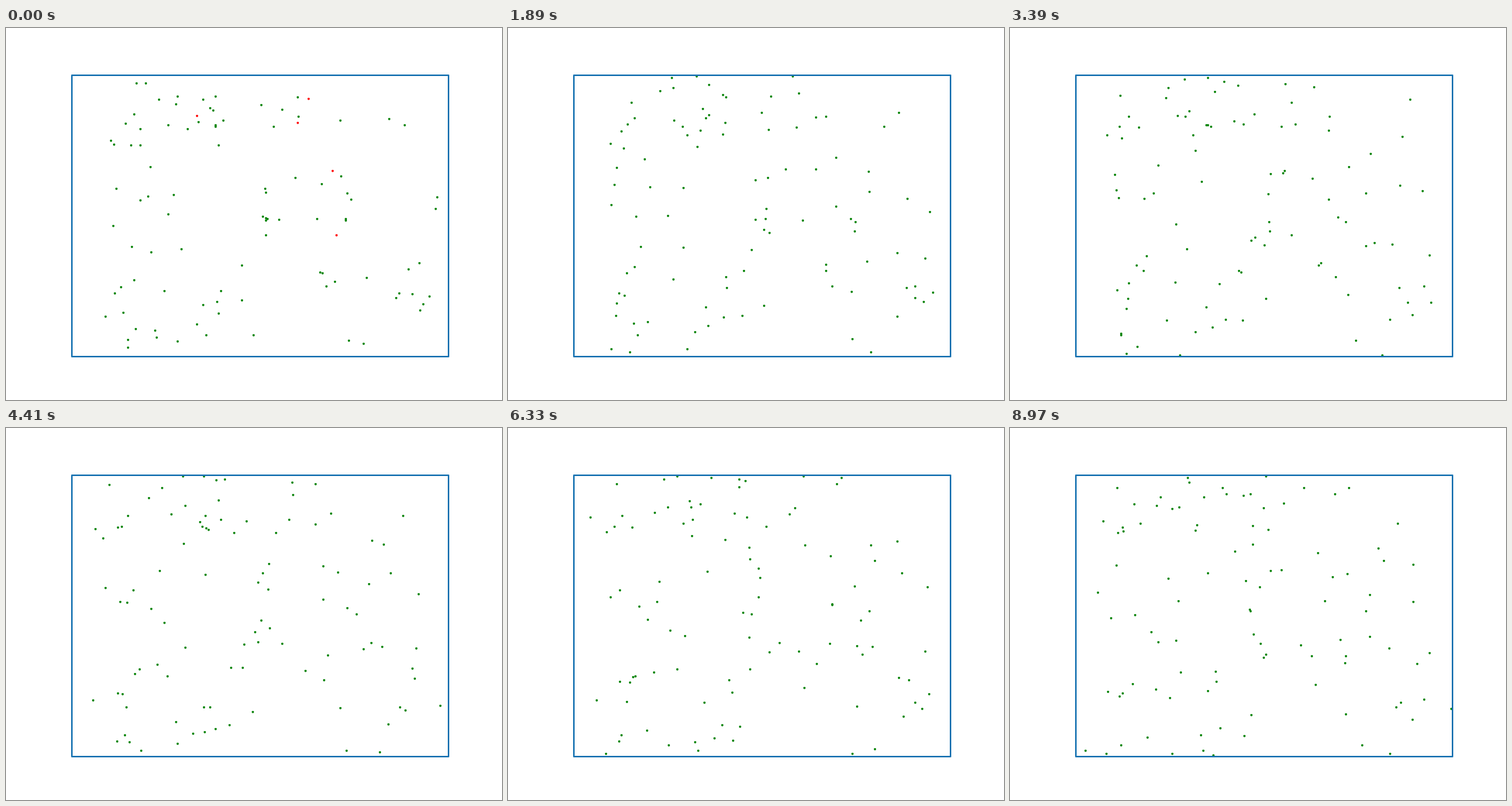
An HTML page with a canvas that plays this animation: 640x480 px, repeating every 9 s.

```html
<!DOCTYPE html>
<html lang="en">
<head>
<meta charset="utf-8">
<title>Random walk</title>
<style>
  html, body { margin: 0; width: 100%; height: 100%; overflow: hidden; background: #fff; }
  canvas { display: block; }
</style>
</head>
<body>
<canvas id="stage" width="640" height="480"></canvas>
<script>
const ctx = document.getElementById('stage').getContext('2d');
const STEP_MS = 30, STEPS = 300, RED_MS = 900;
const STRIDE = { x: 2.4, y: 2.1 };
const MIN = { x: 87, y: 62.5 }, MAX = { x: 571.5, y: 422.5 };

const reds = [[246, 113], [390, 91], [376, 122], [421, 184], [426, 267]]
  .map(([x, y]) => ({ x, y }));

// Green dots start scattered over zones of differing density.
const zones = [
  { x: 130, y: 67, w: 165, h: 118, count: 24 },
  { x: 113, y: 207, w: 125, h: 86, count: 9 },
  { x: 290, y: 187, w: 161, h: 98, count: 16 },
  { x: 113, y: 322, w: 166, h: 94, count: 18 },
  { x: 301, y: 306, w: 173, h: 107, count: 10 },
  { x: 503, y: 296, w: 62, h: 80, count: 8 },
  { x: 321, y: 74, w: 225, h: 61, count: 8 },
  { x: 534, y: 216, w: 31, h: 26, count: 2 }
];

function seeded(seed) {
  return () => {
    seed = (seed + 0x6D2B79F5) | 0;
    let r = Math.imul(seed ^ (seed >>> 15), 1 | seed);
    r = (r + Math.imul(r ^ (r >>> 7), 61 | r)) ^ r;
    return ((r ^ (r >>> 14)) >>> 0) / 4294967296;
  };
}

const rand = seeded(41);

const scatter = zone => Array.from({ length: zone.count }, () => ({
  x: zone.x + rand() * zone.w,
  y: zone.y + rand() * zone.h
}));

// One step back, none or forward along an axis, kept inside the box.
function move(value, axis) {
  const next = value + (Math.floor(rand() * 3) - 1) * STRIDE[axis];
  return Math.max(MIN[axis], Math.min(MAX[axis], next));
}

const walk = [reds.concat(zones.flatMap(scatter))];
while (walk.length < STEPS) {
  const last = walk[walk.length - 1];
  walk.push(last.map(d => ({ x: move(d.x, 'x'), y: move(d.y, 'y') })));
}

function drawDot(dot, color) {
  ctx.fillStyle = color;
  ctx.beginPath();
  // Dots sit on whole pixels.
  ctx.arc(Math.floor(dot.x) + 0.5, Math.floor(dot.y) + 0.5, 1.45, 0, Math.PI * 2);
  ctx.fill();
}

function draw(step) {
  ctx.fillStyle = '#fff';
  ctx.fillRect(0, 0, 640, 480);
  const redCount = step * STEP_MS < RED_MS ? reds.length : 0;
  walk[step].forEach((dot, i) => drawDot(dot, i < redCount ? '#ff0000' : '#008000'));
  ctx.strokeStyle = '#1f77b4';
  ctx.lineWidth = 2;
  ctx.lineJoin = 'round';
  ctx.strokeRect(85, 61, 486, 363);
}

const start = performance.now();
function tick(now) {
  const time = Math.max(0, now - start);
  draw(Math.floor(time / STEP_MS) % STEPS);
  requestAnimationFrame(tick);
}
draw(0);
requestAnimationFrame(tick);
</script>
</body>
</html>
```
